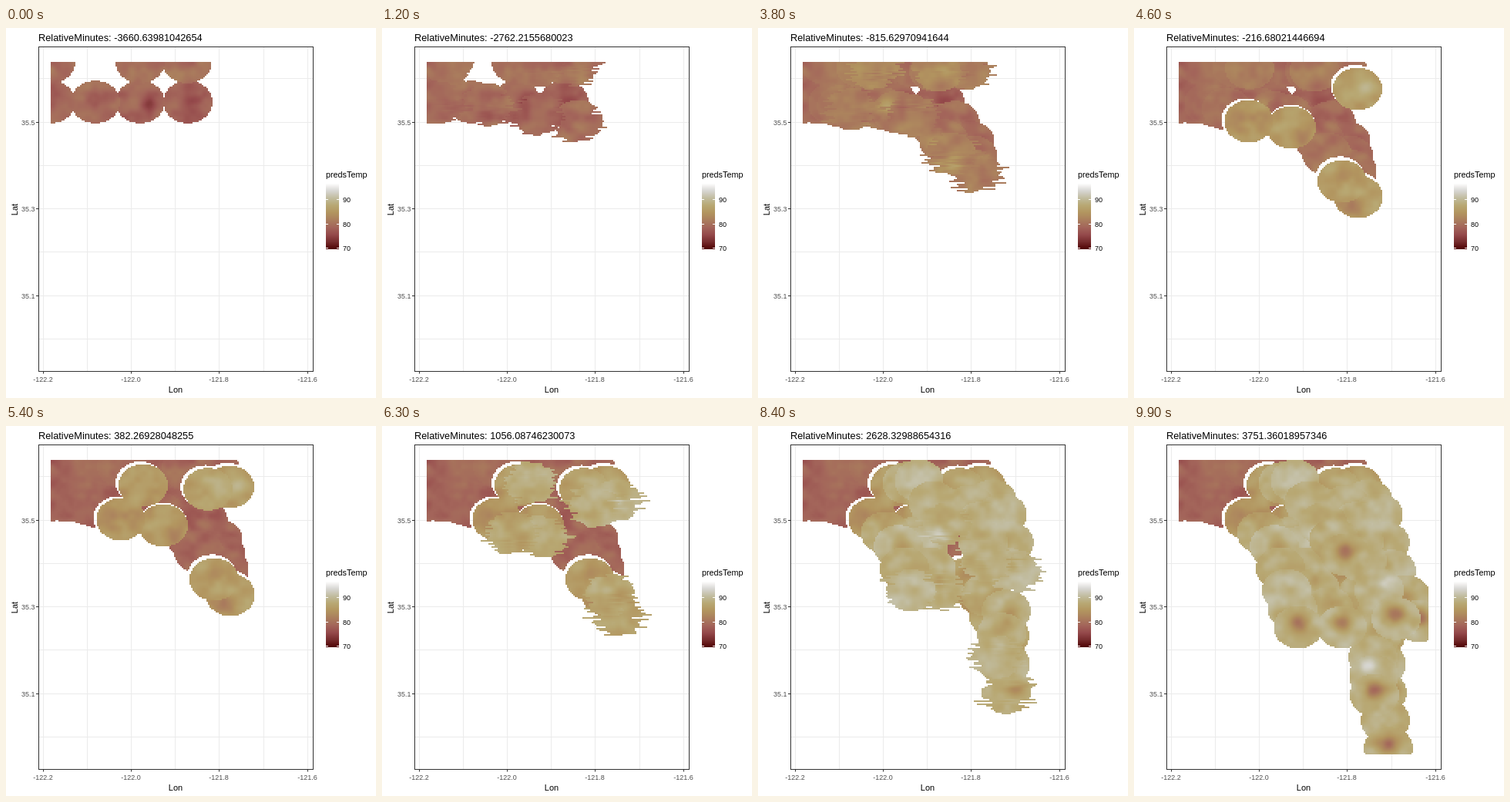
Animation, 480 px wide and 480 px high, one loop 10 s. Source, as an HTML page with a canvas:

```html
<!DOCTYPE html>
<html lang="en">
<head>
<meta charset="utf-8">
<title>predsTemp map</title>
<style>
html, body { margin: 0; width: 100%; height: 100%; overflow: hidden; background: #fff; }
svg, canvas { position: absolute; display: block; }
svg { left: 0; top: 0; font: 9px "Liberation Sans", Arial, sans-serif; }
canvas { left: 58px; top: 44px; width: 324px; height: 382px; image-rendering: pixelated; }
</style>
</head>
<body>
<svg id="plot" width="480" height="480"></svg>
<canvas id="map" width="162" height="191"></canvas>
<script>
const W = 162, H = 191, CELL = 2, LEFT = 58, TOP = 44;
const RX = 32, RY = 27.5;
const LOW = 69.8, HIGH = 97, OLD = 78.5;
const palette = ['4d0001', '752b2c', '95494b', 'a3655a', 'aa7e5d',
  'b2955f', 'b8a873', 'c1bc9f', 'd8d7d4', 'ffffff'];
const rgb = palette.map(h => [0, 2, 4].map(i => parseInt(h.slice(i, i + 2), 16)));

// Seven sensors drift across the map; each leaves a disc at every waypoint and half way between.
const keyTimes = [0, 2500, 3800, 5400, 7200, 8400, 9900];
const drifters = [
  '236,96 275,148 283,186 291,219 320,272 322,346 330,418',
  '174,96 232,129 250,163 270,199 322,240 310,300 312,349',
  '116,96 160,104 200,114 204,129 214,158 235,212 270,261',
  '58,96 97,98 120,105 149,121 182,156 198,213 213,261',
  '235,44 264,52 270,52 290,79 317,115 334,188 370,253',
  '174,44 228,55 234,55 262,82 288,126 296,175 340,250',
  '58,44 116,48 150,52 178,77 209,71 245,127 274,167'
].map(path => path.split(' ').map(point => point.split(',').map(Number)));
const LAST = 2 * (keyTimes.length - 1);
const GAP = 4, RESUME = 6; // samples around the break in the record

const mix = (a, b, u) => a + (b - a) * u;
const clamp = v => Math.max(0, Math.min(1, v));
const smooth = u => u * u * (3 - 2 * u);
const scale = value => clamp((value - LOW) / (HIGH - LOW));
const hash = (a, b) => {
  const v = Math.sin(a * 127.1 + b * 311.7) * 43758.5453;
  return v - Math.floor(v);
};

function noise(x, y) {
  const i = Math.floor(x), j = Math.floor(y), u = smooth(x - i), v = smooth(y - j);
  return mix(mix(hash(i, j), hash(i + 1, j), u), mix(hash(i, j + 1), hash(i + 1, j + 1), u), v) - .5;
}

function colour(value) {
  const p = scale(value) * (rgb.length - 1);
  const i = Math.min(rgb.length - 2, Math.floor(p));
  return rgb[i].map((c, k) => mix(c, rgb[i + 1][k], p - i));
}

const ramp = Array.from({ length: 273 }, (_, i) => colour(LOW + i / 10));
const grain = Float32Array.from({ length: W * H }, (_, n) => {
  const x = n % W, y = Math.floor(n / W);
  return 3.5 * noise(x / 9, y / 7) + 1.5 * noise(x / 4, y / 4);
});
const ctx = document.getElementById('map').getContext('2d');
const image = ctx.createImageData(W, H);
const field = new Float32Array(W * H);
const fresh = new Uint8Array(W * H);

// Sample positions count in half segments between waypoints.
const along = (values, q, blend) => {
  const i = Math.min(values.length - 2, Math.floor(q / 2));
  return blend(values[i], values[i + 1], q / 2 - i);
};
const timeAt = q => along(keyTimes, q, mix);
const placeAt = (path, q) =>
  along(path, q, (a, b, u) => [mix(a[0], b[0], u), mix(a[1], b[1], u)]);
function sampleAt(time) {
  let i = 0;
  while (i < keyTimes.length - 2 && time >= keyTimes[i + 1]) i++;
  return 2 * (i + (time - keyTimes[i]) / (keyTimes[i + 1] - keyTimes[i]));
}
const warmth = time => 79.3 + 9.5 * smooth(clamp((time - 1500) / 6500));

// Visits the cells of a disc; ragged shifts each row sideways.
function eachCell([x, y], ragged, visit) {
  const x0 = Math.max(0, Math.floor((x - RX - 16 - LEFT) / CELL));
  const x1 = Math.min(W - 1, Math.ceil((x + RX + 16 - LEFT) / CELL));
  const y0 = Math.max(0, Math.floor((y - RY - TOP) / CELL));
  const y1 = Math.min(H - 1, Math.ceil((y + RY - TOP) / CELL));
  for (let j = y0; j <= y1; j++) {
    const shift = 110 * ragged * (hash(j, Math.round(x)) - .5) ** 3;
    for (let i = x0; i <= x1; i++) {
      const u = (LEFT + (i + .5) * CELL - x - shift) / RX;
      const v = (TOP + (j + .5) * CELL - y) / RY;
      if (u * u + v * v < 1) visit(j * W + i, u, v);
    }
  }
}

function drawDisc(k, q, ragged) {
  const sample = Math.ceil(q), path = drifters[k];
  const rim = warmth(timeAt(q)) + 2 * hash(k, sample) - .7;
  const ending = sample === LAST;
  const core = (ending ? -9 : 9 * hash(sample, k + 9) - 4.5) * (1 - sample + q);
  const ox = ending ? 0 : hash(k + 3, sample) - .5;
  const oy = ending ? -.2 : hash(k + 5, sample) - .5;
  if (q === RESUME) { // the new disc leaves a sliver empty behind it
    const behind = placeAt(path, mix(RESUME, GAP, .13));
    eachCell(behind, 0, n => { if (!fresh[n]) field[n] = 0; });
  }
  eachCell(placeAt(path, q), ragged, (n, u, v) => {
    const d = (u - ox) ** 2 + (v - oy) ** 2;
    field[n] = rim + core * Math.exp(-d * 6) + grain[n];
    fresh[n] = q >= RESUME;
  });
}

function fadeOld(amount) {
  field.forEach((value, n) => {
    if (value) field[n] = mix(value, OLD + grain[n], amount);
  });
}

function drawMap(time) {
  const now = sampleAt(time);
  const ragged = Math.sin(Math.PI * time / 2475) ** 2;
  const end = now > GAP ? Math.max(RESUME, Math.ceil(now)) : Math.ceil(now);
  field.fill(0);
  fresh.fill(0);
  for (let j = 0; j <= end; j++) {
    if (j === GAP + 1) {
      fadeOld(.8 * clamp((now - GAP) / 2));
      continue;
    }
    drifters.forEach((_, k) => {
      if (j !== RESUME) drawDisc(k, Math.min(j, now), j >= now ? ragged : 0);
      else if (now >= GAP + .2 * (k + 1)) drawDisc(k, RESUME, 0);
    });
  }
  field.forEach((value, n) => {
    image.data.set([...ramp[Math.round(scale(value) * 272)], value ? 255 : 0], n * 4);
  });
  ctx.putImageData(image, 0, 0);
}

function buildPlot() {
  const line = (x1, y1, x2, y2, stroke) =>
    `<path d="M${x1} ${y1}L${x2} ${y2}" stroke="${stroke}"/>`;
  const text = (x, y, label, attrs = '') => `<text x="${x}" y="${y}" ${attrs}>${label}</text>`;
  const grey = 'fill="#4d4d4d"';
  let out = '';
  for (let i = 0; i < 7; i++) {
    const x = Math.round(47.6 + i * 57.2) + .5, y = Math.round(65.4 + i * 56.25) + .5;
    out += line(x, 24, x, 445, '#ebebeb') + line(42, y, 398, y, '#ebebeb');
    if (i % 2 === 0) {
      out += line(x, 445, x, 448.5, '#333');
      out += text(x - .5, 459, (-122.2 + i / 10).toFixed(1), grey + ' text-anchor="middle"');
    } else {
      out += line(39, y, 42, y, '#333');
      out += text(37.5, y + 3.5, (35.6 - i / 10).toFixed(1), grey + ' text-anchor="end"');
    }
  }
  out += '<rect x="42.5" y="24.5" width="356" height="421" fill="none" stroke="#333"/>';
  for (let y = 201; y < 287; y++) {
    const c = colour(HIGH - (y - 201) / 3.15).map(Math.round);
    out += `<rect x="415" y="${y}" width="17" height="1" fill="rgb(${c})"/>`;
  }
  for (let label = 70; label <= 90; label += 10) {
    const y = Math.floor(285.5 - (label - 70) * 3.15) + .5;
    out += line(415, y, 418, y, '#fff') + line(429, y, 432, y, '#fff');
    out += text(437, y + 3.5, label);
  }
  out += text(415, 194, 'predsTemp', 'font-size="10.8"');
  out += text(220, 473, 'Lon', 'font-size="11" text-anchor="middle"');
  out += text(0, 0, 'Lat', 'font-size="11" text-anchor="middle" transform="translate(15 235.5) rotate(-90)"');
  out += text(42, 17, '', 'id="title" font-size="12.8"');
  document.getElementById('plot').innerHTML = out;
}

buildPlot();
const title = document.getElementById('title');
const begin = performance.now();
let shown = -1;

function tick() {
  const step = Math.floor(Math.max(0, performance.now() - begin) % 10000 / 100);
  if (step !== shown) {
    shown = step;
    const minutes = -3660.63981042654 + step * 7412 / 99;
    title.textContent = 'RelativeMinutes: ' + +minutes.toFixed(11);
    drawMap(step * 100);
  }
  requestAnimationFrame(tick);
}
tick();
</script>
</body>
</html>
```
